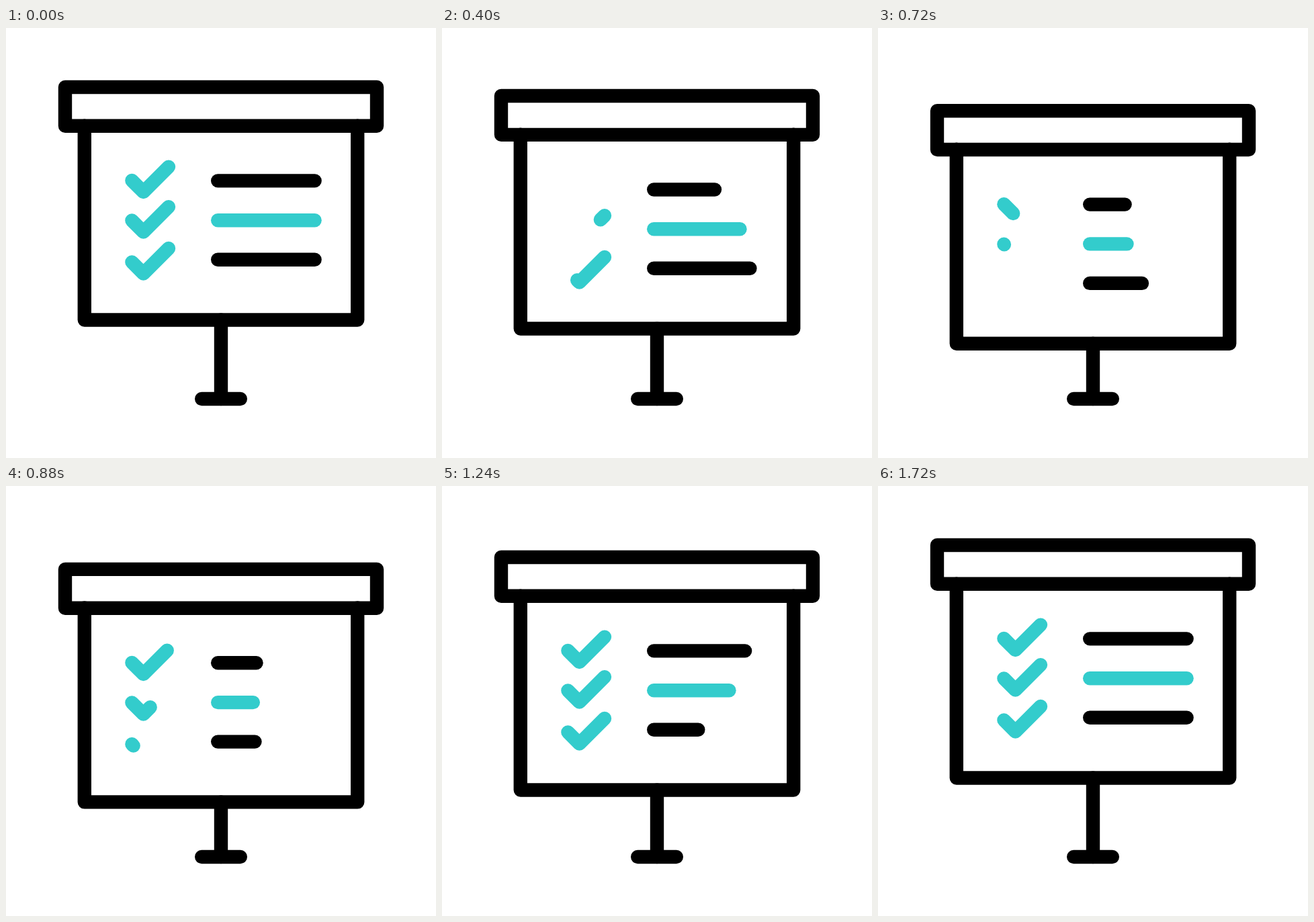
Write an HTML page with a canvas that moves like this. It is 640 px wide and 640 px high and loops after 2 s.

```html
<!DOCTYPE html>
<html lang="en">
<head>
<meta charset="utf-8">
<title>Checklist board</title>
<style>
  html, body { margin: 0; width: 100%; height: 100%; overflow: hidden; background: #fff; }
  canvas { display: block; width: 100vw; height: 100vh; }
</style>
</head>
<body>
<canvas id="stage" width="640" height="640"></canvas>
<script>
const ctx = document.getElementById('stage').getContext('2d');
const LOOP = 2000, STEP = 40;
const BLACK = '#000', TEAL = '#33cccc';
const CHECK_LEN = Math.hypot(17.1, 17.1) + Math.hypot(37.5, 37.5);

// cubic-bezier(.65, 0, .35, 1), solved by bisection
function ease(x) {
  if (x <= 0) return 0;
  if (x >= 1) return 1;
  let lo = 0, hi = 1;
  for (let i = 0; i < 24; i++) {
    const s = (lo + hi) / 2, r = 1 - s;
    if (1.95 * s * r * r + 1.05 * s * s * r + s * s * s < x) lo = s;
    else hi = s;
  }
  return lo * lo * (3 - 2 * lo);
}

const ramp = (t, start, length) => ease((t - start) / length);

function stroke(color, points, closed) {
  ctx.strokeStyle = color;
  ctx.beginPath();
  points.forEach(([x, y]) => ctx.lineTo(x, y));
  if (closed) ctx.closePath();
  ctx.stroke();
}

// Strokes the tick between two fractions of its length
function check(y, from, to) {
  if (to - from < 0.0005) return;
  ctx.setLineDash([(to - from) * CHECK_LEN, 200]);
  ctx.lineDashOffset = -from * CHECK_LEN;
  stroke(TEAL, [[187.4, y], [204.5, y + 17.1], [242, y - 20.4]]);
  ctx.setLineDash([]);
}

function draw(t) {
  const dy = 36 * (ramp(t, 40, 800) - ramp(t, 840, 800));
  ctx.fillStyle = '#fff';
  ctx.fillRect(0, 0, 640, 640);
  ctx.lineWidth = 20.4;
  ctx.lineCap = ctx.lineJoin = 'round';

  // Stand
  stroke(BLACK, [[320, 434.5 + dy], [320, 552]]);
  stroke(BLACK, [[291.2, 552], [348.8, 552]]);

  ctx.save();
  ctx.translate(0, dy);
  stroke(BLACK, [[88, 88], [552, 88], [552, 145.8], [88, 145.8]], true);
  stroke(BLACK, [[116.8, 145.6], [116.8, 434.5], [523.2, 434.5], [523.2, 145.6]]);

  [227, 286.5, 348.4].forEach((y, i) => {
    const erased = ramp(t, 120 * i, 400);
    const drawn = ramp(t, 560 + 120 * i, 400);
    if (erased < 1) check(y, erased, 1);
    else check(y, 0, drawn);
  });

  [227.4, 286.2, 344.7].forEach((y, i) => {
    const cut = ramp(t, 40 + [0, 120, 280][i], 680) - ramp(t, 720 + [0, 120, 280][i], 720);
    stroke(i === 1 ? TEAL : BLACK, [[315.2, y], [459.6 - 92 * cut, y]]);
  });
  ctx.restore();
}

const begin = performance.now();
function tick() {
  const t = (performance.now() - begin) % LOOP;
  draw(Math.floor(t / STEP) * STEP);
  requestAnimationFrame(tick);
}
tick();
</script>
</body>
</html>
```
